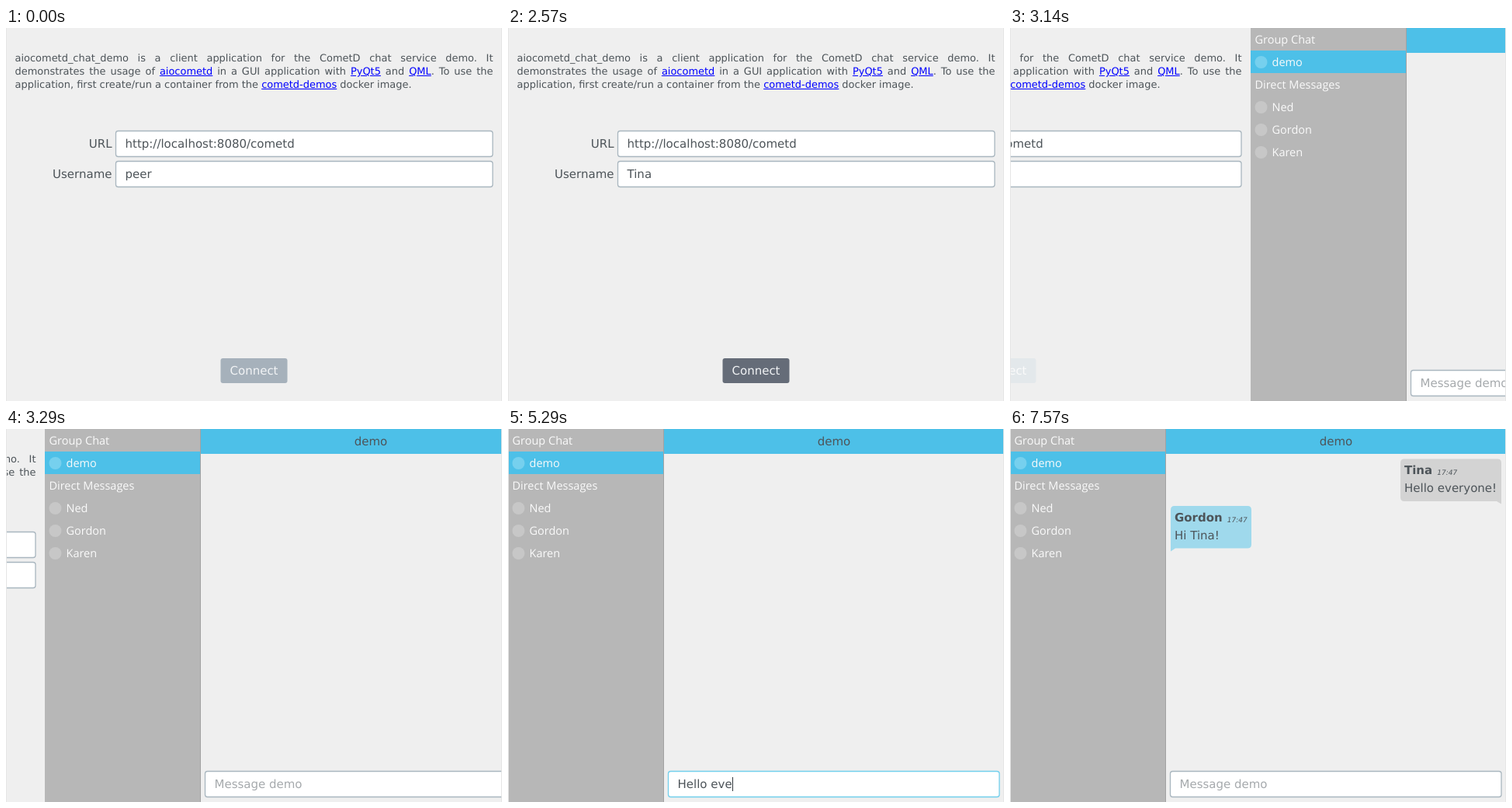
Recreate the animation shown at these times as an HTML page. Size 639 px wide and 480 px high, loop 8 s.

```html
<!DOCTYPE html>
<html lang="en">
<head>
<meta charset="utf-8">
<title>Chat demo</title>
<style>
  html, body { margin: 0; width: 100%; height: 100%; overflow: hidden; background: #efefef; }
  svg { display: block; }
  text, p { font-family: "DejaVu Sans", sans-serif; fill: #4d5459; color: #4d5459; white-space: pre; }
  text { font-size: 15px; text-rendering: geometricPrecision; }
  p { margin: 0; font-size: 12.96px; line-height: 17px; text-align: justify; white-space: normal; text-rendering: geometricPrecision; }
  u { color: #00f; }
  .side text { font-family: "Open Sans", "Noto Sans", sans-serif; font-size: 14.5px; font-weight: 500; fill: #fafafa; }
  .box { fill: #fff; stroke: #a9b6bf; stroke-width: 1.3; }
  .focus .box { stroke: #72cfec; }
  .caret { fill: #30363b; }
  .hint { fill: #a6aaad; }
  .name { font-weight: bold; }
  .time { font-size: 9px; font-style: oblique; font-weight: normal; }
</style>
</head>
<body>
<svg width="639" height="480" viewBox="0 0 639 480">
  <rect width="639" height="480" fill="#efefef"/>
  <g id="form">
    <foreignObject x="11.500" y="31" width="616" height="60">
      <p>aiocometd_chat_demo is a client application for the CometD chat service demo. It demonstrates the usage of <u>aiocometd</u> in a GUI application with <u>PyQt5</u> and <u>QML</u>. To use the application, first create/run a container from the <u>cometd-demos</u> docker image.</p>
    </foreignObject>
    <text x="136.500" y="154" text-anchor="end">URL</text>
    <text x="136.500" y="193" text-anchor="end">Username</text>
    <rect class="box" x="141.500" y="132.500" width="485.500" height="33" rx="3"/>
    <text x="153.500" y="154">http://localhost:8080/cometd</text>
    <g id="login">
      <rect class="box" x="141.500" y="171.500" width="485.500" height="33" rx="3"/>
      <text class="value" x="153.500" y="193"></text>
      <rect class="caret" y="179" width="1" height="18"/>
    </g>
    <rect id="button" x="276.500" y="425" width="86" height="32" rx="3"/>
    <text id="caption" x="319.500" y="446" text-anchor="middle">Connect</text>
  </g>
  <g id="chat">
    <rect width="639" height="480" fill="#efefef"/>
    <g class="side" id="side">
      <rect width="200" height="480" fill="#b7b7b7"/>
      <rect y="29" width="200" height="29" fill="#4dc0e8"/>
    </g>
    <rect x="200" width="1" height="480" fill="#a2a2a2"/>
    <rect x="201" width="438" height="32" fill="#4dc0e8"/>
    <text x="420" y="21" text-anchor="middle">demo</text>
    <g id="sent">
      <path d="M508 38.500H628Q633 38.500 633 43.500V96.500L627 93H508Q503 93 503 88V43.500Q503 38.500 508 38.500Z" fill="#d3d3d3"/>
      <text class="name" x="508" y="58">Tina<tspan class="time" dx="6" dy="1">17:47</tspan></text>
      <text x="508" y="81">Hello everyone!</text>
    </g>
    <g id="reply">
      <path d="M212 99H306Q311 99 311 104V148.500Q311 153.500 306 153.500H213L207 157.500V104Q207 99 212 99Z" fill="#9fd9ec"/>
      <text class="name" x="212" y="119">Gordon<tspan class="time" dx="6" dy="1">17:47</tspan></text>
      <text x="212" y="142">Hi Tina!</text>
    </g>
    <g id="message">
      <rect class="box" x="206.500" y="440.500" width="426.500" height="33" rx="3"/>
      <text class="hint" x="218.500" y="462">Message demo</text>
      <text class="value" x="218.500" y="462"></text>
      <rect class="caret" y="448" width="1" height="18"/>
    </g>
  </g>
  <path d="M.5 0V480M638.500 0V480" stroke="#e6e6e6"/>
</svg>
<script>
const LOOP = 8000, TICK = 1000 / 7, WIDTH = 639;
const GREETING = 'Hello everyone!';
const LOGIN_EDITS = [[0, 'peer'], [420, 'pee'], [560, 'p'], [700, ''], [990, 'T'], [1140, 'Ti'], [1280, 'Tina']];
const $ = id => document.getElementById(id);
const within = (t, from, to) => t >= from && t < to;
const show = (node, on) => node.setAttribute('visibility', on ? 'visible' : 'hidden');

function buildSidebar() {
  const add = (tag, attrs, label = '') => {
    const node = document.createElementNS('http://www.w3.org/2000/svg', tag);
    for (const key in attrs) node.setAttribute(key, attrs[key]);
    node.textContent = label;
    $('side').append(node);
  };
  ['Group Chat', 'demo', 'Direct Messages', 'Ned', 'Gordon', 'Karen'].forEach((label, row) => {
    const heading = row === 0 || row === 2;
    if (!heading) add('circle', { cx: 13.5, cy: 15 + 29 * row, r: 8, fill: row === 1 ? '#76d0ee' : '#c7c7c7' });
    add('text', { x: heading ? 5.5 : 27.5, y: 20 + 29 * row }, label);
  });
}

// The caret blinks 500 ms on, 500 ms off, restarting at the last edit.
function setField(id, value, focused, sinceEdit) {
  const field = $(id), text = field.querySelector('.value'), caret = field.querySelector('.caret');
  text.textContent = value;
  field.classList.toggle('focus', focused);
  const end = Number(text.getAttribute('x')) + (value ? text.getComputedTextLength() : 0);
  caret.setAttribute('x', Math.round(end));
  show(caret, focused && sinceEdit % 1000 < 500);
}

function typedMessage(t) {
  if (!within(t, 4560, 6130)) return '';
  return GREETING.slice(0, Math.floor((t - 4480) / 88));
}

function render(t) {
  const [, login] = LOGIN_EDITS.filter(([at]) => at <= t).pop();
  setField('login', login, within(t, 140, 2560), t < 1280 ? 0 : t - 1280);

  const [fill, ink] = t < 2560 ? ['#a6b1bb', '#f1f3f5'] : t < 2710 ? ['#656c78', '#f1f3f5'] : ['#e3e8eb', '#fafafa'];
  $('button').style.fill = fill;
  $('caption').style.fill = ink;

  const progress = Math.min(1, Math.max(0, (t - 3057) / 400));
  const left = WIDTH * (1 - progress) ** 3;
  $('form').setAttribute('transform', `translate(${Math.round(left - WIDTH)} 0)`);
  $('chat').setAttribute('transform', `translate(${Math.round(left)} 0)`);

  const draft = typedMessage(t);
  const lastEdit = t < 4560 ? 3990 : t < 6130 ? Math.min(t, 5850) : 6060;
  setField('message', draft, within(t, 3990, 6990), t - lastEdit);
  show(document.querySelector('.hint'), !draft);
  show($('sent'), t >= 6270);
  show($('reply'), t >= 7560);
}

const start = performance.now();
function frame() {
  const elapsed = (performance.now() - start) % LOOP;
  render(Math.floor((elapsed + 3) / TICK) * TICK % LOOP);
  requestAnimationFrame(frame);
}
buildSidebar();
frame();
</script>
</body>
</html>
```
